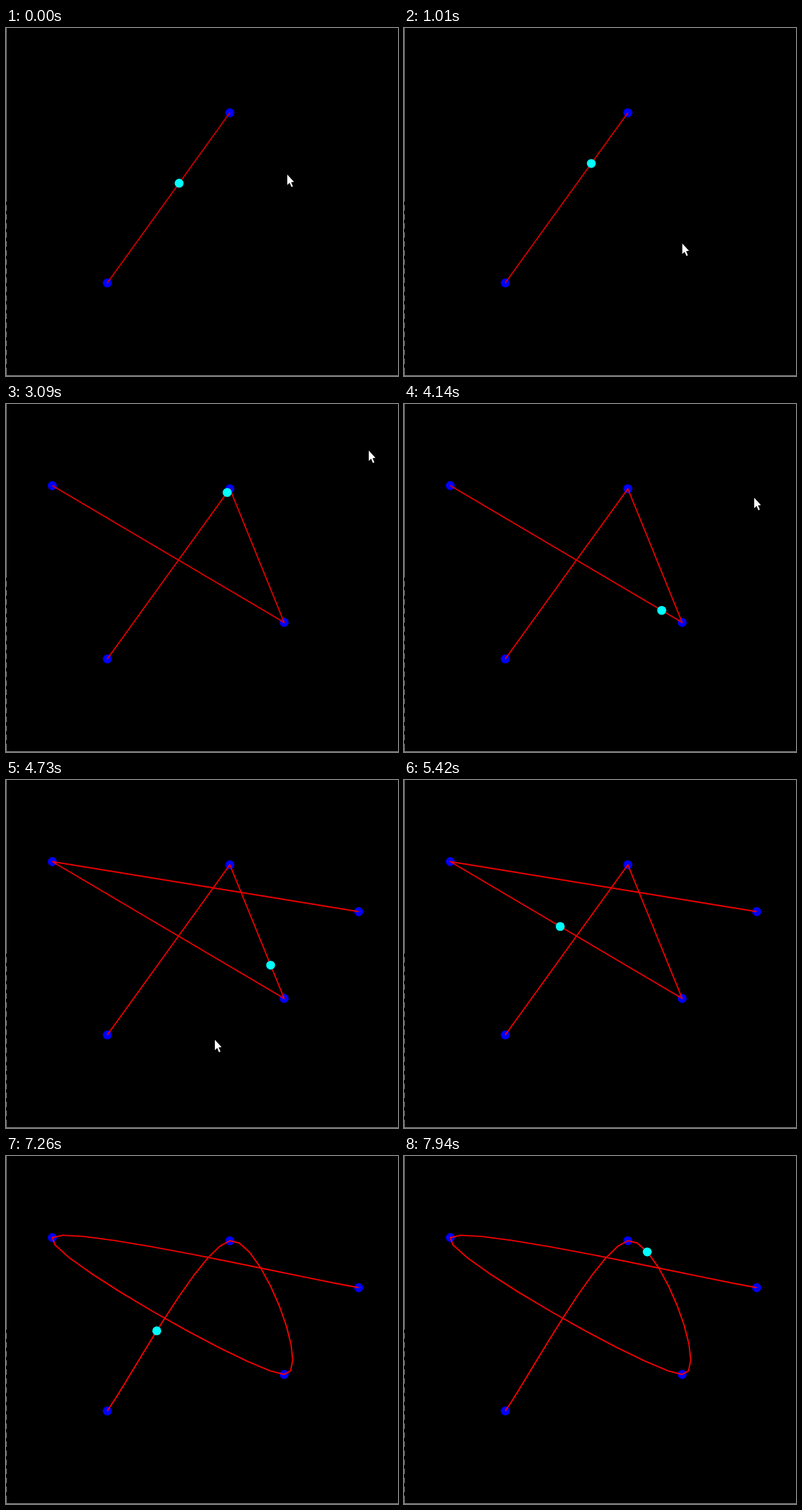
These frames come from a looping animation (563x501 px, 7.99 s). An HTML page with a canvas:

```html
<!DOCTYPE html>
<html lang="en">
<head>
<meta charset="utf-8">
<title>Path editor</title>
<style>
html, body { margin: 0; width: 100%; height: 100%; overflow: hidden; background: #000; }
canvas { display: block; }
</style>
</head>
<body>
<canvas id="stage" width="563" height="501"></canvas>
<script>
const W = 563, H = 501, LOOP = 7990;
const ctx = document.getElementById('stage').getContext('2d');

// Control points with the time each one is placed
const points = [
  { x: 145.5, y: 367, at: 0 },
  { x: 321.5, y: 122, at: 0 },
  { x: 399.5, y: 314.5, at: 1150 },
  { x: 66.5, y: 117.5, at: 2480 },
  { x: 506.5, y: 189.5, at: 4400 }
];
const SMOOTH_AT = 7000, POINTER_GONE = 4890;
const PANEL = { from: 6350, to: 6950 };

// Distance along the path, in segments
const travel = [
  { at: 0, s: 0.585 }, { at: 1950, s: 2.739 }, { at: 3090, s: 3.977 },
  { at: 4140, s: 5.087 }, { at: 5420, s: 6.525 }, { at: 6680, s: 7.798 },
  { at: 7940, s: 9.195 }
];

// The pointer visits each placed point and a few turns in between
const pointer = [
  { at: 0, x: 404, y: 211 },
  { at: 1600, x: 386, y: 397 },
  { at: 1950, x: 141, y: 242 },
  { at: 3090, x: 521, y: 67 },
  { at: 3500, x: 511, y: 48 },
  { at: 4140, x: 503, y: 135 },
  { at: 4730, x: 300, y: 374 },
  { at: POINTER_GONE, x: 52, y: 327 },
  ...points.filter(p => p.at > 0)
].sort((a, b) => a.at - b.at);

const mix = (a, b, u) => a + (b - a) * u;
const linear = u => u;
const smoothstep = u => u * u * (3 - 2 * u);

function track(keys, name, t, ease) {
  let i = 0;
  while (i < keys.length - 2 && t >= keys[i + 1].at) i++;
  const a = keys[i], b = keys[i + 1];
  return mix(a[name], b[name], ease((t - a.at) / (b.at - a.at)));
}

function hermite(a, b, ma, mb, u) {
  const u2 = u * u, u3 = u2 * u;
  return (2 * u3 - 3 * u2 + 1) * a + (u3 - 2 * u2 + u) * ma
    + (3 * u2 - 2 * u3) * b + (u3 - u2) * mb;
}

function pathAt(pts, s, smooth) {
  const i = Math.min(Math.floor(s), pts.length - 2), u = s - i;
  const p = pts[i], q = pts[i + 1];
  const before = pts[i - 1] || p, after = pts[i + 2] || q;
  const coord = k => smooth
    ? hermite(p[k], q[k], (q[k] - before[k]) / 2, (after[k] - p[k]) / 2, u)
    : mix(p[k], q[k], u);
  return { x: coord('x'), y: coord('y') };
}

function disc(p, color) {
  ctx.fillStyle = color;
  ctx.beginPath();
  ctx.arc(p.x, p.y, 6.4, 0, 2 * Math.PI);
  ctx.fill();
}

function drawPath(pts, smooth, t) {
  const steps = smooth ? 10 : 1;
  ctx.beginPath();
  for (let k = 0; k <= (pts.length - 1) * steps; k++) {
    const p = pathAt(pts, k / steps, smooth);
    ctx.lineTo(p.x, p.y);
  }
  ctx.strokeStyle = `rgb(${Math.round(Math.min(245, 200 + t / 150))},0,0)`;
  ctx.lineWidth = 1.9;
  ctx.lineJoin = 'round';
  ctx.stroke();
}

function drawPointer(x, y) {
  ctx.save();
  ctx.translate(x, y);
  const arrow = new Path2D('M0 0V15L3.4 11.8L6 18L8 17L5.5 11L9.6 10.4Z');
  ctx.strokeStyle = '#000';
  ctx.lineWidth = 2;
  ctx.stroke(arrow);
  ctx.fillStyle = '#fff';
  ctx.fill(arrow);
  ctx.restore();
}

function drawPanel() {
  ctx.fillStyle = '#0a2d3d';
  ctx.fillRect(1, 0, 63, 54);
  const shade = ctx.createLinearGradient(0, 0, 46, 54);
  shade.addColorStop(0, '#0b5069');
  shade.addColorStop(1, '#0e5873');
  ctx.fillStyle = shade;
  ctx.fillRect(1, 0, 45, 53);
  ctx.strokeStyle = '#3c4a50';
  ctx.lineWidth = 1;
  ctx.stroke(new Path2D('M1 53.5H62L63.5 52V0'));
}

function drawBorder() {
  ctx.fillStyle = '#909090';
  ctx.fillRect(0, H - 1, W, 1);
  ctx.fillStyle = '#808080';
  ctx.fillRect(0, 0, 1, H);
  // Worn lower part of the left edge
  ctx.fillStyle = '#000';
  for (let y = 250; y < H - 10; y += 13) ctx.fillRect(0, y, 1, 5);
}

function draw(t) {
  const pts = points.filter(p => t >= p.at);
  const smooth = t >= SMOOTH_AT;
  ctx.fillStyle = '#000';
  ctx.fillRect(0, 0, W, H);

  for (const p of pts) disc(p, '#00f');
  drawPath(pts, smooth, t);
  const s = track(travel, 's', t, linear);
  disc(pathAt(pts, s % (pts.length - 1), smooth), '#0ff');

  if (t >= PANEL.from && t < PANEL.to) drawPanel();
  if (t < POINTER_GONE) {
    drawPointer(track(pointer, 'x', t, smoothstep), track(pointer, 'y', t, smoothstep));
  }
  drawBorder();
}

const start = performance.now();
function tick() {
  draw((performance.now() - start) % LOOP);
  requestAnimationFrame(tick);
}
tick();
</script>
</body>
</html>
```
